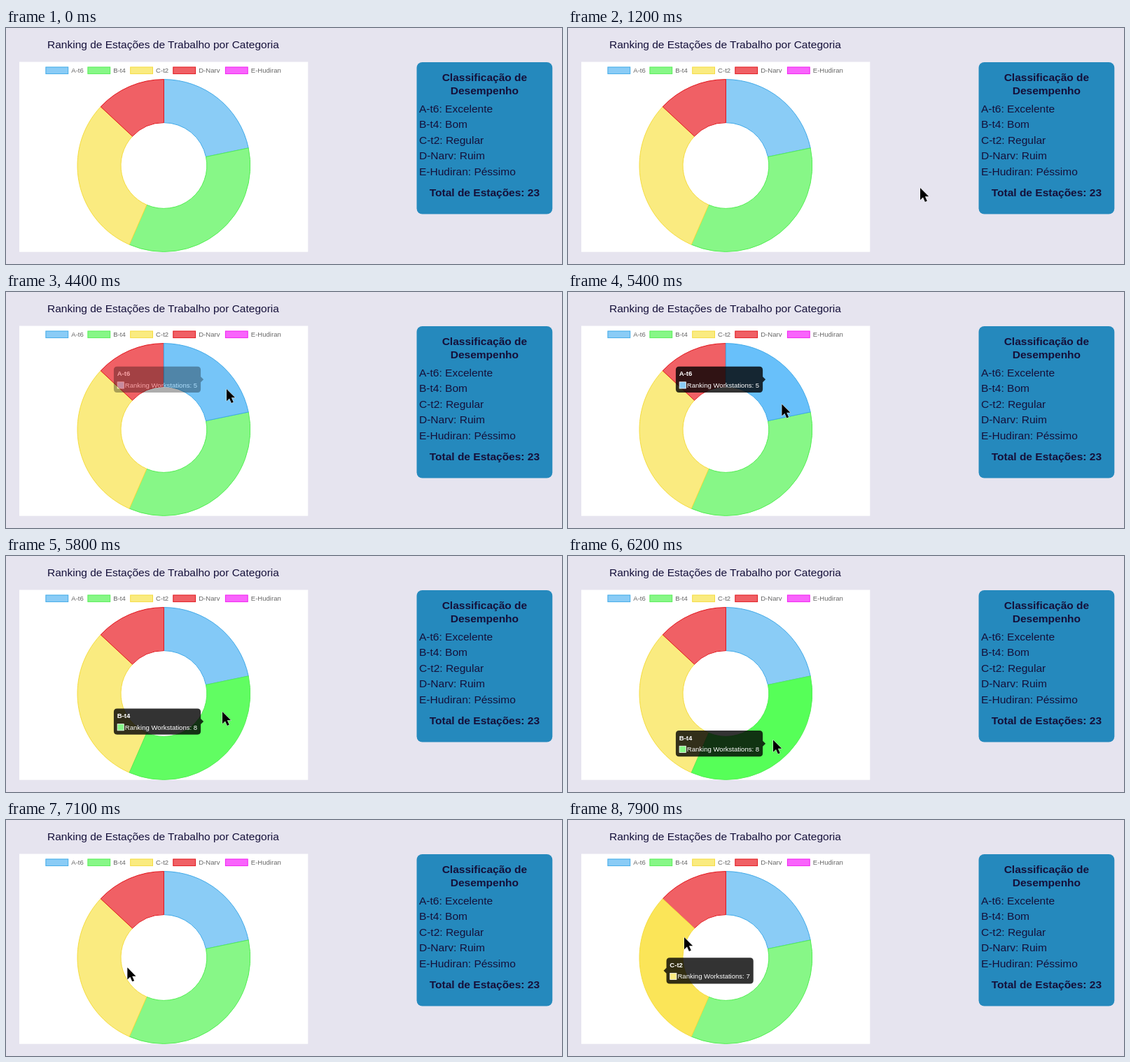
Write an HTML page that moves like this. It is 794 by 338 pixels and loops after 8000 ms.

```html
<!DOCTYPE html>
<html lang="pt">
<head>
<meta charset="utf-8">
<title>Ranking de Estações</title>
<style>
  html, body { margin: 0; width: 100%; height: 100%; overflow: hidden; background: #e6e4ef; }
  svg { display: block; width: 794px; height: 338px; }
  text { font-family: "Liberation Sans", Arial, sans-serif; font-size: 15.5px; fill: #15103a; }
  .bold { font-weight: bold; }
  .mid { text-anchor: middle; }
  .small { font-size: 9.55px; fill: #666; }
  .light { font-size: 9.55px; fill: #fff; }
</style>
</head>
<body>
<svg id="stage" viewBox="0 0 794 338" xmlns="http://www.w3.org/2000/svg"></svg>
<script>
const LOOP = 8000, STEP = 100;
const CX = 225.4, CY = 197, OUTER = 123.4, INNER = 61.4;
const items = [
  { name: "A-t6", rank: "Excelente", count: 5, fill: [138, 204, 246], hover: [104, 192, 250], line: "#3fa9e8", legendX: 56.9 },
  { name: "B-t4", rank: "Bom", count: 8, fill: [135, 247, 135], hover: [86, 255, 88], line: "#55ee55", legendX: 116.9 },
  { name: "C-t2", rank: "Regular", count: 7, fill: [250, 235, 128], hover: [251, 229, 88], line: "#f5dc40", legendX: 177.7 },
  { name: "D-Narv", rank: "Ruim", count: 3, fill: [240, 96, 101], hover: [245, 65, 70], line: "#e2161c", legendX: 238.8 },
  { name: "E-Hudiran", rank: "Péssimo", count: 0, fill: [249, 100, 252], hover: [250, 70, 255], line: "#f01df0", legendX: 313.4 }
];
const hovers = [
  { item: 0, on: 4320, off: 5674 },
  { item: 1, on: 5674, off: 6730 },
  { item: 2, on: 7150, off: Infinity }
];
// Pointer tip: time, x, y
const path = [
  [100, 520, 268], [300, 503, 229], [2450, 503, 229], [2800, 540, 226], [3200, 580, 215],
  [3300, 578, 211], [3500, 560, 196], [3900, 455, 166], [4200, 361, 148], [4320, 333, 141],
  [4400, 315, 139], [4800, 303, 146], [5000, 303, 146], [5500, 306, 164], [5674, 308, 181],
  [5800, 309, 223], [6000, 303, 255], [6400, 283, 272], [6650, 267, 262], [6730, 254, 250],
  [6800, 230, 227], [7000, 192, 216], [7150, 164, 209], [7400, 145, 201], [7600, 147, 190],
  [7750, 153, 176], [7900, 166, 168]
];

const stage = document.getElementById("stage");
const clamp = v => Math.max(0, Math.min(1, v));
const lerp = (a, b, k) => a + (b - a) * k;
const easeOut = v => 1 - (1 - clamp(v)) ** 4;
const rgb = c => `rgb(${c.map(Math.round)})`;

function add(tag, attrs, parent = stage, content = "") {
  const el = document.createElementNS("http://www.w3.org/2000/svg", tag);
  for (const key in attrs) el.setAttribute(key, attrs[key]);
  el.textContent = content;
  parent.appendChild(el);
  return el;
}
const label = (x, y, content, cls = "", parent = stage) => add("text", { x, y, class: cls }, parent, content);
const polar = (r, a) => `${CX + r * Math.sin(a)} ${CY - r * Math.cos(a)}`;

function ring(a, b) {
  const large = b - a > Math.PI ? 1 : 0;
  return `M${polar(OUTER, a)}A${OUTER} ${OUTER} 0 ${large} 1 ${polar(OUTER, b)}` +
    `L${polar(INNER, b)}A${INNER} ${INNER} 0 ${large} 0 ${polar(INNER, a)}Z`;
}

label(59, 29.3, "Ranking de Estações de Trabalho por Categoria");
add("rect", { x: 19, y: 48.5, width: 412.3, height: 272.2, fill: "#fff" });

for (const it of items) {
  add("rect", { x: it.legendX, y: 56, width: 31.8, height: 9.6, fill: rgb(it.fill), stroke: it.line });
  label(it.legendX + 36.4, 64.1, it.name, "small");
}

const donut = add("g", { "stroke-linejoin": "bevel" });
const total = items.reduce((sum, it) => sum + it.count, 0);
let angle = 0;
for (const it of items) {
  const next = angle + it.count / total * 2 * Math.PI;
  const mid = (angle + next) / 2, r = (OUTER + INNER) / 2;
  it.x = CX + r * Math.sin(mid);
  it.y = CY - r * Math.cos(mid);
  if (it.count) it.slice = add("path", { d: ring(angle, next), stroke: it.line }, donut);
  angle = next;
}

add("rect", { x: 586.5, y: 49, width: 193.8, height: 217.5, rx: 8, fill: "#2589bd" });
label(683.4, 76, "Classificação de", "bold mid");
label(683.4, 94.5, "Desempenho", "bold mid");
items.forEach((it, i) => label(590, 120.6 + 22.5 * i, `${it.name}: ${it.rank}`));
label(683.4, 241.3, `Total de Estações: ${total}`, "bold mid");

const TIP_W = 124.2, TIP_H = 37.3, CARET = 4, GAP = 1.6;
const tip = add("g", {});
const tipShape = add("path", { fill: "#000", "fill-opacity": 0.8 }, tip);
const tipTitle = label(4.8, 13.8, "", "light bold", tip);
const tipKey = add("rect", { x: 5.2, y: 22.2, width: 9.2, height: 9.2, stroke: "#fff", "stroke-width": 0.8 }, tip);
const tipBody = label(15.9, 30.1, "", "light", tip);

function bubble(caretLeft) {
  const r = 4.8, w = TIP_W, h = TIP_H, m = h / 2;
  const right = caretLeft ? "" : `V${m - CARET}l${CARET} ${CARET}l${-CARET} ${CARET}`;
  const left = caretLeft ? `V${m + CARET}l${-CARET} ${-CARET}l${CARET} ${-CARET}` : "";
  return `M${r} 0H${w - r}Q${w} 0 ${w} ${r}${right}V${h - r}Q${w} ${h} ${w - r} ${h}` +
    `H${r}Q0 ${h} 0 ${h - r}${left}V${r}Q0 0 ${r} 0Z`;
}

const pointer = add("path", {
  d: "M0 0V17.2L4 13.4 6.9 20 9.8 18.8 6.9 12.3H12.2Z",
  fill: "#000", stroke: "#fff", "stroke-width": 0.9, "paint-order": "stroke"
});

const onLeft = it => it.x < CX;
const tipPlace = it => [
  onLeft(it) ? it.x + GAP + CARET : it.x - GAP - CARET - TIP_W,
  it.y - TIP_H / 2
];

function drawSlices(t) {
  items.forEach((it, i) => {
    if (!it.slice) return;
    const h = hovers.find(v => v.item === i);
    const k = h ? easeOut((t - h.on) / 400) * (1 - easeOut((t - h.off) / 400)) : 0;
    it.slice.setAttribute("fill", rgb(it.fill.map((c, n) => lerp(c, it.hover[n], k))));
    donut.appendChild(it.slice);
  });
  const active = hovers.find(h => t >= h.on && t < h.off);
  if (active) donut.appendChild(items[active.item].slice);
}

function drawTip(t) {
  const n = hovers.filter(h => t >= h.on).length - 1;
  if (n < 0) return tip.setAttribute("opacity", 0);
  const h = hovers[n], prev = hovers[n - 1], it = items[h.item];
  const joined = prev && prev.off === h.on;
  const fadeIn = joined ? 1 : clamp((t - h.on) / 200);
  const fadeOut = clamp((t - h.off) / 200);
  const to = tipPlace(it), from = prev ? tipPlace(items[prev.item]) : to;
  const k = easeOut((t - h.on) / 400);
  tip.setAttribute("opacity", fadeIn * (1 - fadeOut));
  tip.setAttribute("transform", `translate(${to.map((v, i) => lerp(from[i], v, k))})`);
  tipShape.setAttribute("d", bubble(onLeft(it)));
  tipKey.setAttribute("fill", rgb(it.fill));
  tipTitle.textContent = it.name;
  tipBody.textContent = `Ranking Workstations: ${it.count}`;
}

function drawPointer(t) {
  // The pointer hides while idle.
  const shown = t >= 100 && !(t >= 2300 && t < 2500);
  pointer.setAttribute("opacity", shown ? 1 : 0);
  const i = path.findIndex(p => p[0] > t);
  const b = path[i < 0 ? path.length - 1 : i];
  const a = i > 0 ? path[i - 1] : b;
  const k = a === b ? 0 : (t - a[0]) / (b[0] - a[0]);
  pointer.setAttribute("transform", `translate(${lerp(a[1], b[1], k)} ${lerp(a[2], b[2], k)})`);
}

function render(time) {
  const t = Math.floor(time % LOOP / STEP) * STEP;
  drawSlices(t);
  drawTip(t);
  drawPointer(t);
}

const start = performance.now();
function tick() {
  render(performance.now() - start);
  requestAnimationFrame(tick);
}
tick();
</script>
</body>
</html>
```
